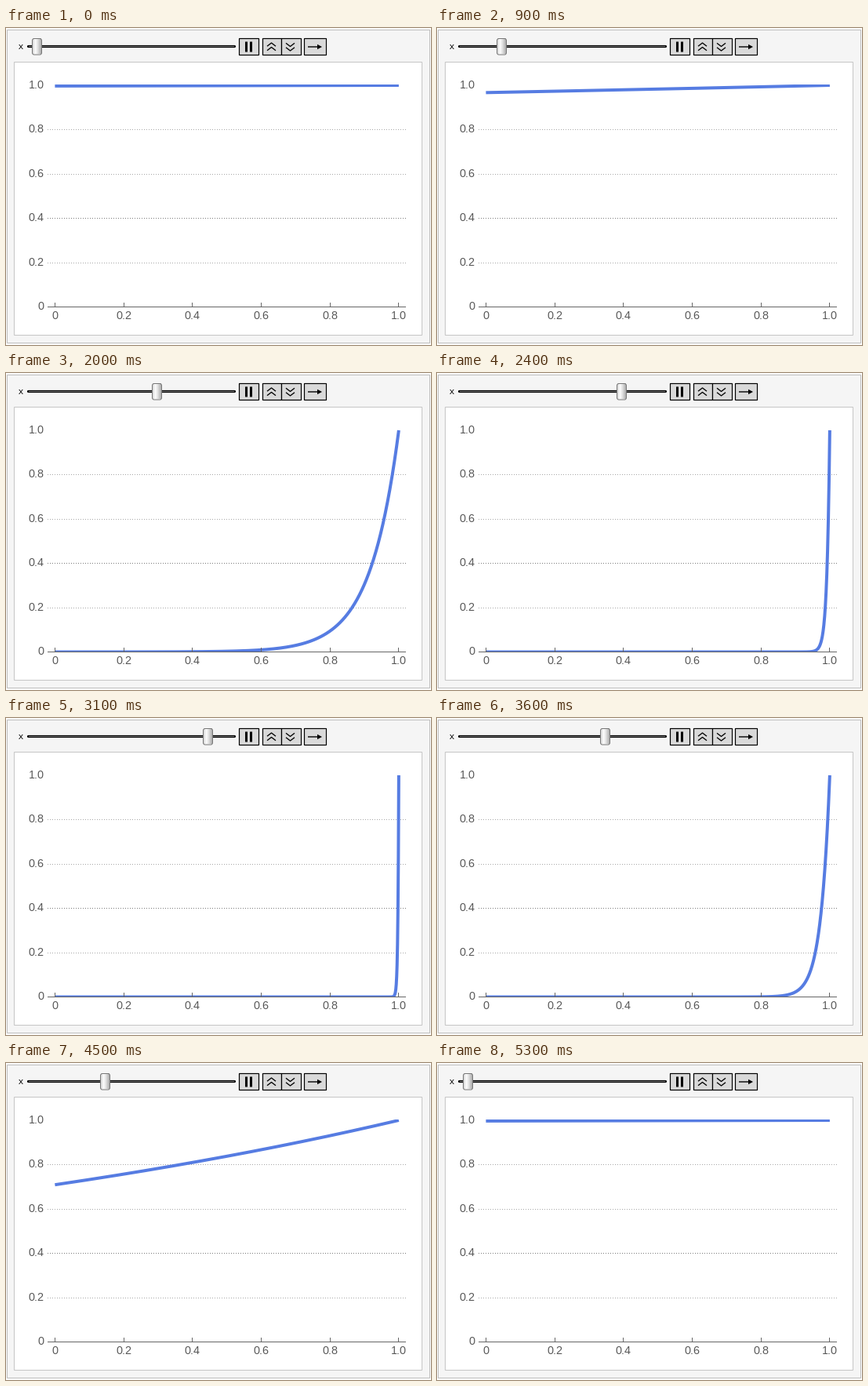
Write a matplotlib script that moves like this. It is 542 by 404 pixels and loops after 6000 ms.

```python
import numpy as np
import matplotlib.pyplot as plt
from matplotlib.animation import FuncAnimation
from matplotlib.patches import FancyBboxPatch, Polygon, Rectangle

# Coordinates are exact pixels, so shapes must not be snapped again.
plt.rcParams.update({"path.snap": False, "text.hinting": "default",
                     "text.hinting_factor": 1})

W, H, DPI = 542, 404, 100
PX = 72 / DPI                      # points per pixel
FRAMES, INTERVAL = 60, 100
TOP_STEP = 11
X0, X_SPAN = 62.4, 438.5
Y0, Y_SPAN = 355.5, 282.5
INK, TEXT, BLUE = "#000000", "#555555", "#567ce2"

fig = plt.figure(figsize=(W / DPI, H / DPI), dpi=DPI, facecolor="white")
ax = fig.add_axes([0, 0, 1, 1])
ax.axis("off")


def line(xs, ys, color=INK, width=1.0, **kw):
    kw.setdefault("solid_capstyle", "butt")
    return ax.plot(xs, ys, color=color, lw=width * PX, **kw)[0]


def box(x, y, w, h, face, edge, width=1.0, z=1):
    ax.add_patch(Rectangle((x, y), w, h, fc=face, ec=edge, lw=width * PX, zorder=z))


def label(x, y, s, size=13.5, color=TEXT, ha="center"):
    ax.text(x, y, s, fontsize=size * PX, color=color, ha=ha, va="baseline",
            family="Liberation Sans")


def chevrons(cx, apexes, drop):
    for y in apexes:
        line([cx - 5.5, cx, cx + 5.5], [y + drop, y, y + drop], width=1.3, zorder=3)


def draw_controls():
    label(19, 27, "x", size=11, color=INK)
    line([28.5, 291.5], [23.5, 23.5], width=3.2, solid_capstyle="round", zorder=2)
    line([29, 291], [23.5, 23.5], "#777777", 1, zorder=2.1)

    for x, w in ((297.5, 25), (327.5, 24), (351.5, 25), (380.5, 28)):
        box(x, 13.5, w, 21, "#d9d9d9", INK, 1.2)
    for x in (306.5, 312.5):
        line([x, x], [17.5, 30.5], width=3, zorder=3)
    chevrons(338.5, (19, 24.5), 4.2)
    chevrons(362.5, (23.5, 29), -4.2)
    line([385, 399], [24, 24], width=1.4, zorder=3)
    ax.add_patch(Polygon([(397, 20.8), (403, 24), (397, 27.2)], fc=INK, lw=0, zorder=3))


def draw_plot():
    box(10.5, 43.5, 520, 348, "white", "#c6c6c6")
    for i in range(6):
        v = i / 5
        x = np.floor(X0 + X_SPAN * v) + 0.5
        y = np.floor(Y0 - Y_SPAN * v) + 0.5
        name = f"{v:.1f}" if i else "0"
        label(x, 371, name)
        label(48.6, y + 3.5, name, ha="right")
        line([x, x], [350, 355], "#666666", zorder=6)
        if 0 < i < 5:
            shade = "#7c7c7c" if i == 2 else "#a8a8a8"
            line([53, 511], [y, y], shade, zorder=2,
                 dashes=(1, 2), dash_capstyle="butt")
    line([53, 510], [Y0, Y0], "#666666", zorder=6)


box(1.5, 2.5, 539, 399, "#f5f5f5", "#bcbcbc")
draw_controls()
draw_plot()

t = 1 - np.linspace(0, 1, 500) ** 3
curve = line(X0 + X_SPAN * t, t, BLUE, 4, zorder=4)
curve.set_clip_path(Rectangle((0, 72), W, 283, transform=ax.transData))

shine = np.interp(np.linspace(0, 1, 24), [0, 0.3, 0.6, 1], [0.84, 0.99, 0.88, 0.68])
knob_fill = ax.imshow(shine[None, :], cmap="gray", vmin=0, vmax=1, aspect="auto",
                      extent=(34, 45, 34, 13), zorder=7)
knob = FancyBboxPatch((33.5, 13.5), 12, 20.5, fc="none", ec="#777777", lw=PX,
                      boxstyle="round,pad=0,rounding_size=2.5", zorder=8)
ax.add_patch(knob)
ax.set(xlim=(0, W), ylim=(H, 0))

step_times = np.floor(7.03 + 2.235 * np.arange(2 * TOP_STEP))


def update(frame):
    passed = int(np.sum(step_times <= frame))
    step = TOP_STEP - abs(TOP_STEP - passed)

    # Each slider step multiplies the decay rate.
    rate = 1.1 * 3.2 ** (step - 5)
    value = np.exp(-rate * (1 - t) * (1 + 0.06 * t))
    curve.set_ydata(Y0 - Y_SPAN * value)

    left = np.floor(33.12 + 21.875 * step)
    knob.set_x(left + 0.5)
    knob_fill.set_extent((left + 1, left + 12, 33.5, 14))
    return curve, knob, knob_fill


anim = FuncAnimation(fig, update, frames=FRAMES, interval=INTERVAL,
                     repeat=True, repeat_delay=0, blit=False)
plt.show()
```
